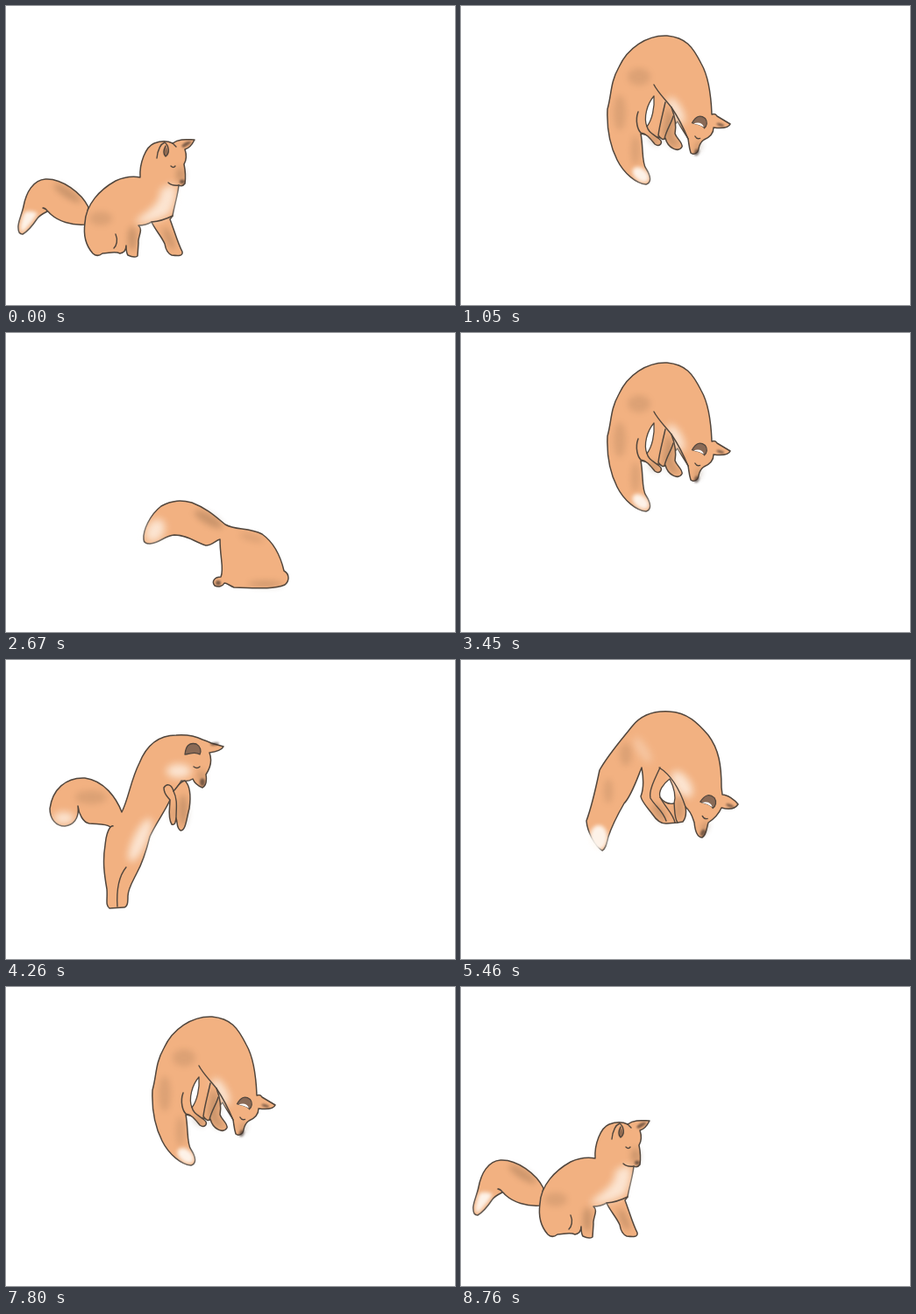
An HTML page without scripts that plays this animation: 512x342 px, repeating every 8.79 s.

```html
<!DOCTYPE html>
<html lang="en">
<head>
<meta charset="utf-8">
<title>Pouncing fox</title>
<style>
html, body { margin: 0; width: 100%; height: 100%; overflow: hidden; background: #fff; }
svg { display: block; width: 512px; height: 342px; overflow: hidden; }

/* drawings sit side by side; the strip steps through them and back */
#strip { animation: leap 2197.5ms infinite alternate; }
@keyframes leap {
  0% { transform: translateX(0); animation-timing-function: step-end; }
  3.71% { transform: translateX(-512px); animation-timing-function: step-end; }
  11.13% { transform: translateX(-1024px); animation-timing-function: step-end; }
  18.54% { transform: translateX(-1536px); animation-timing-function: step-end; }
  25.96% { transform: translateX(-2048px); animation-timing-function: step-end; }
  33.38% { transform: translateX(-2560px); animation-timing-function: step-end; }
  40.8% { transform: translateX(-3072px); animation-timing-function: step-end; }
  48.21% { transform: translateX(-3584px); animation-timing-function: step-end; }
  55.63% { transform: translateX(-4096px); animation-timing-function: step-end; }
  63.05% { transform: translateX(-4608px); animation-timing-function: step-end; }
  70.46% { transform: translateX(-5120px); animation-timing-function: step-end; }
  77.88% { transform: translateX(-5632px); animation-timing-function: step-end; }
  85.3% { transform: translateX(-6144px); animation-timing-function: step-end; }
  92.71%, 100% { transform: translateX(-6656px); animation-timing-function: step-end; }
}

path { stroke-linejoin: round; stroke-linecap: round; }
.b { fill: #f2b181; stroke: #51463d; stroke-width: 1.5; }
.l { fill: none; stroke: #51463d; stroke-width: 1.4; }
.h { fill: #fff; stroke: #51463d; stroke-width: 1.3; }
.e { fill: #8a6a56; stroke: #51463d; stroke-width: 1.3; }
.s { fill: #6e5238; opacity: .3; filter: blur(3.5px); }
.p { fill: #6e5238; opacity: .16; filter: blur(3.5px); }
.k { fill: #3f3029; opacity: .65; filter: blur(1.3px); }
.w { fill: #fff6ec; opacity: .75; filter: blur(4px); }
.t { fill: #fffaf4; opacity: .9; filter: blur(2px); }
</style>
</head>
<body>
<svg viewBox="0 0 512 342" xmlns="http://www.w3.org/2000/svg">
<defs>
  <g id="face">
    <ellipse class="k" cx="25" cy="-6" rx="5" ry="1.8" transform="rotate(-6 25 -6)"/>
    <ellipse class="s" cx="10" cy="31" rx="4" ry="7"/>
    <ellipse class="k" cx="11" cy="38" rx="3" ry="4.5"/>
    <path class="e" d="M-9,6C-8,-4 -4,-8 4,-6C9,-3 10,2 8,6C2,2 -4,6 -9,6Z"/>
    <path class="l" d="M1,20q4,3 7,0"/>
  </g>
  <path id="inner" fill="#fff" d="M-7,6Q1,-1 7,5Q0,4 -7,6Z"/>

  <g id="sit">
    <path class="b" d="M94,230C86,214 64,197 45,198C31,199 23,213 20,229C18,239 13,248 14,254C14,259 16,261 19,261C24,258 31,250 35,244C37,240 43,237 47,235C46,232 44,231 42,231C47,232 48,236 52,239C60,246 74,251 90,250Z"/>
    <path class="t" d="M21,236Q28,233 36,237C33,243 27,251 19,259C14,257 17,246 21,236Z"/>
    <ellipse class="s" cx="70" cy="214" rx="18" ry="5" transform="rotate(33 70 214)"/>
    <path class="b" d="M153,196C152,180 159,161 169,157C177,154 184,154 190,157C198,151 208,153 215,153C212,159 208,163 204,164C206,170 206,176 203,181C204,186 205,196 204,203C202,206 199,206 197,205C196,216 191,232 190,240L187,244C191,254 196,272 201,281C202,286 197,286 189,285C184,283 182,278 181,272C177,263 170,256 166,247C161,250 156,251 151,251C157,256 150,264 151,271L150,286C147,288 143,287 139,285C137,282 137,278 137,274C137,279 135,282 130,283C124,280 117,283 110,283C106,286 102,286 99,283C91,274 88,262 90,248C91,227 107,210 125,200C136,195 147,195 153,196Z"/>
    <path class="w" d="M191,203C199,212 190,234 186,238C176,245 160,249 149,249C146,240 178,232 176,210Z"/>
    <ellipse class="s" cx="144" cy="266" rx="5" ry="14"/>
    <ellipse class="s" cx="186" cy="266" rx="4" ry="14" transform="rotate(-24 186 266)"/>
    <ellipse class="p" cx="108" cy="243" rx="13" ry="8"/>
    <ellipse class="s" cx="199" cy="193" rx="5" ry="9"/>
    <ellipse class="k" cx="201" cy="201" rx="3" ry="2.5"/>
    <path class="k" d="M200,160Q205,154 212,155Q208,160 202,162Z"/>
    <path class="l" d="M172,174C173,165 176,158 181,156C186,160 187,168 182,172C179,169 180,164 182,160M188,183q3,3 5,0M125,261C128,268 126,274 123,277M190,240Q178,246 166,247M190,157L194,161M185,202Q189,206 197,205"/>
    <path class="k" d="M181,171Q179,164 183,160Q186,167 183,171Z"/>
  </g>

  <g id="rear">
    <path class="b" d="M132,174C126,158 112,138 90,135C68,134 53,148 50,170C50,182 57,190 67,190C76,189 84,182 82,167C83,176 88,186 95,187C106,188 114,187 119,191C114,198 114,204 113,212C110,230 112,245 115,262C116,274 113,280 118,284L134,283C139,283 139,276 139,270C139,262 144,254 149,244C154,235 160,218 164,202C170,188 182,172 187,160L200,138C205,139 210,138 213,136C215,141 219,144 224,146C228,144 229,138 228,131C234,122 235,114 232,106C239,105 246,103 248,99L234,95C232,94 230,93 224,91C218,88 208,85 194,86C174,86 160,98 152,118C142,138 140,158 132,174Z"/>
    <ellipse class="w" cx="153" cy="206" rx="8" ry="27" transform="rotate(25 153 206)"/>
    <ellipse class="w" cx="197" cy="127" rx="14" ry="8"/>
    <ellipse class="w" cx="66" cy="181" rx="12" ry="7"/>
    <ellipse class="p" cx="97" cy="157" rx="18" ry="8"/>
    <path class="b" d="M180,146C184,140 189,143 191,150C196,145 198,139 204,138C210,144 211,156 209,170C206,180 205,196 199,195C194,192 196,186 194,181C193,186 193,189 189,188C184,180 187,168 187,160C184,156 180,154 180,146Z"/>
    <ellipse class="s" cx="202" cy="172" rx="5" ry="18"/>
    <ellipse class="s" cx="190" cy="176" rx="2" ry="9"/>
    <path class="l" d="M127,282C126,266 128,248 137,237M191,150C196,160 194,170 194,181M119,191Q122,189 122,190"/>
    <use href="#face" transform="translate(213 102)"/>
  </g>

  <g id="spring">
    <path class="b" d="M100,236C92,226 98,200 112,184C124,170 140,162 152,150C156,120 168,84 196,64C214,52 236,54 248,62L266,68C262,76 256,78 250,78C253,90 250,98 244,106C244,114 240,120 235,118C230,114 228,110 224,108C220,112 217,116 212,120C206,140 198,158 188,172C184,190 178,212 172,232C170,244 162,246 158,242C154,226 154,204 156,188C146,192 136,206 128,222C122,234 110,244 100,236Z"/>
    <ellipse class="w" cx="190" cy="146" rx="8" ry="25" transform="rotate(24 190 146)"/>
    <ellipse class="w" cx="105" cy="230" rx="7" ry="8"/>
    <ellipse class="p" cx="128" cy="194" rx="11" ry="8"/>
    <path class="b" d="M200,126C210,116 218,120 222,130C226,142 228,156 222,164C214,164 214,152 211,146C206,142 200,136 200,126Z"/>
    <ellipse class="s" cx="220" cy="148" rx="3" ry="12"/>
    <path class="l" d="M165,240C164,222 166,206 174,190"/>
    <use href="#face" transform="translate(229 75) scale(.95)"/>
  </g>

  <g id="rise">
    <path class="b" d="M150,220C142,210 142,180 150,160C152,130 158,90 178,60C196,36 222,28 240,36C262,44 270,64 276,92L296,104C292,110 284,110 278,108C280,116 276,124 268,128C268,136 264,144 259,144C254,140 253,134 251,128C244,124 238,118 232,112L230,140L196,150C188,160 186,172 182,190C176,208 164,226 150,220Z"/>
    <ellipse class="w" cx="237" cy="106" rx="9" ry="13"/>
    <ellipse class="w" cx="155" cy="212" rx="8" ry="8"/>
    <ellipse class="p" cx="168" cy="130" rx="7" ry="14"/>
    <path class="b" d="M196,120C192,140 196,156 202,172C206,180 214,176 212,168C208,154 212,140 214,124"/>
    <path class="b" d="M228,108C226,124 228,140 234,152C242,158 246,150 242,142C240,132 242,122 242,116"/>
    <ellipse class="s" cx="235" cy="138" rx="4" ry="12"/>
    <use href="#face" transform="translate(261 101) rotate(16) scale(.9)"/>
  </g>

  <g id="arch">
    <path class="b" d="M211,204C200,203 186,192 178,176C170,160 166,140 167,118C172,100 170,88 180,70C190,48 212,33 235,34C256,36 264,46 274,66C282,80 285,98 286,124C289,123 291,124 292,126L307,135C305,140 296,140 288,139C288,146 284,150 277,153C274,155 272,158 271,163C270,170 264,170 262,168C260,162 260,158 259,152C255,145 250,138 247,132L229,151L205,146C208,162 206,180 211,186C216,194 218,202 211,204Z"/>
    <ellipse class="p" cx="203" cy="81" rx="13" ry="10"/>
    <ellipse class="p" cx="181" cy="122" rx="7" ry="20"/>
    <ellipse class="p" cx="199" cy="165" rx="5" ry="17"/>
    <ellipse class="w" cx="245" cy="120" rx="7" ry="17" transform="rotate(-28 245 120)"/>
    <ellipse class="t" cx="205" cy="193" rx="11" ry="7" transform="rotate(40 205 193)"/>
    <path class="b" d="M202,121C198,132 202,142 205,145C212,146 216,152 221,158C227,162 231,156 226,152C218,146 213,144 212,137"/>
    <path class="b" d="M233,110C230,124 226,138 225,148Q230,155 233,151C236,163 248,168 252,161C253,156 246,152 244,146C246,136 243,124 240,116"/>
    <path class="s" d="M235,115L243,127L242,148L250,160L240,161L229,146Z"/>
    <ellipse class="s" cx="220" cy="153" rx="8" ry="4" transform="rotate(40 220 153)"/>
    <path class="h" d="M220,103C212,112 208,128 212,138C218,130 221,116 220,103Z"/>
    <path class="l" d="M220,90C224,98 232,106 240,116C248,128 254,140 259,152M232,152C234,142 240,134 242,126"/>
    <g transform="translate(273 132) rotate(23) scale(.9)"><use href="#face"/><use href="#inner"/></g>
  </g>

  <g id="fall">
    <path class="b" d="M161,218C152,212 144,196 143,184C150,165 154,145 158,126C168,108 184,90 195,76C206,62 222,58 238,59C258,60 270,72 282,86C294,102 297,120 297,146L298,154C304,154 312,160 316,165C312,171 304,171 297,169C294,176 288,182 282,186C280,192 280,200 275,203C269,203 267,196 266,186C264,180 263,174 256,168C257,174 257,180 253,185L247,186L235,187C228,188 222,182 218,176C212,168 206,162 205,156C209,146 208,134 206,123C200,138 194,156 186,164C178,178 172,190 168,202C166,210 165,216 161,218Z"/>
    <ellipse class="w" cx="207" cy="103" rx="6" ry="17" transform="rotate(-32 207 103)" style="opacity:.3"/>
    <ellipse class="w" cx="252" cy="142" rx="9" ry="17" transform="rotate(-35 252 142)"/>
    <ellipse class="t" cx="157" cy="203" rx="10" ry="14"/>
    <ellipse class="p" cx="188" cy="108" rx="7" ry="13"/>
    <ellipse class="p" cx="168" cy="150" rx="5" ry="14"/>
    <ellipse class="s" cx="226" cy="174" rx="5" ry="12" transform="rotate(-35 226 174)"/>
    <ellipse class="s" cx="249" cy="170" rx="4" ry="14"/>
    <path class="h" d="M238,136C230,142 225,150 227,157C232,164 238,165 243,164C246,154 242,144 238,136Z"/>
    <path class="l" d="M227,123C220,138 214,150 216,158C222,168 230,172 234,184M227,157C234,170 242,176 244,186M243,164C244,172 243,180 247,186M226,123C234,128 246,138 256,168"/>
    <g transform="translate(283 161) rotate(27) scale(.95)"><use href="#face"/><use href="#inner"/></g>
  </g>
</defs>

<g id="strip">
  <use href="#sit"/>
  <use href="#rear" x="512"/>
  <g transform="translate(1024)"><use href="#rear" transform="translate(18 -18) rotate(7 150 190)"/></g>
  <use href="#spring" x="1536"/>
  <g transform="translate(2048)"><use href="#spring" transform="translate(12 -22) rotate(14 170 140)"/></g>
  <use href="#rise" x="2560"/>
  <use href="#arch" x="3072"/>
  <use href="#fall" x="3584"/>
  <g transform="translate(4096)"><use href="#fall" transform="translate(32 48) rotate(18 230 120)"/></g>

  <g transform="translate(4608)">
    <path class="b" d="M116,206C112,192 124,170 148,158C172,148 196,150 214,148C236,124 268,128 292,156C310,180 322,215 326,250C334,262 336,276 330,285C326,293 300,294 288,291C270,288 262,276 262,262C258,268 250,272 240,270C232,262 236,250 238,240C230,224 214,206 200,200C178,194 150,200 138,210C128,216 118,214 116,206Z"/>
    <ellipse class="w" cx="126" cy="198" rx="9" ry="10"/>
    <ellipse class="p" cx="196" cy="170" rx="18" ry="7"/>
    <ellipse class="s" cx="246" cy="258" rx="5" ry="9"/>
    <path class="l" d="M262,262C260,250 258,240 252,230"/>
  </g>

  <g transform="translate(5120)">
    <path class="b" d="M162,218C160,200 174,184 190,180C210,178 234,192 250,205C268,206 288,214 304,232C314,248 317,262 320,274C325,280 322,287 316,290C300,293 280,292 260,291L249,287C246,291 240,291 238,288C236,282 241,279 245,278C247,266 245,250 241,232C232,236 222,234 214,226C202,218 188,218 178,224C170,228 162,226 162,218Z"/>
    <ellipse class="w" cx="172" cy="212" rx="9" ry="9"/>
    <ellipse class="s" cx="228" cy="205" rx="16" ry="6" transform="rotate(32 228 205)"/>
    <ellipse class="s" cx="242" cy="285" rx="3" ry="3"/>
  </g>

  <g transform="translate(5632)">
    <path class="b" d="M157,236C156,226 164,208 177,198C190,191 200,191 212,194C230,201 240,211 250,219C262,226 276,222 292,230C306,240 313,255 317,272C324,276 323,284 318,288C306,293 290,292 260,291C255,289 252,286 249,286C247,290 242,291 238,289C234,284 238,279 245,279C249,270 244,258 244,236C239,237 235,243 228,243C216,240 208,231 192,231C180,232 176,240 164,241C159,241 157,239 157,236Z"/>
    <ellipse class="w" cx="170" cy="226" rx="10" ry="14" transform="rotate(30 170 226)"/>
    <ellipse class="s" cx="231" cy="213" rx="18" ry="6" transform="rotate(30 231 213)"/>
    <ellipse class="p" cx="280" cy="234" rx="14" ry="4" transform="rotate(15 280 234)"/>
    <ellipse class="s" cx="296" cy="287" rx="20" ry="3"/>
    <ellipse class="k" cx="242" cy="286" rx="3" ry="3"/>
  </g>

  <g transform="translate(6144)">
    <path class="b" d="M148,228C145,216 150,210 157,210C168,212 167,228 179,233C204,235 232,231 262,231C276,231 286,233 294,241C304,252 314,268 321,283C321,289 316,291 300,291L258,291C252,288 246,293 240,291C237,288 243,284 241,279C238,272 238,262 235,260C230,258 232,266 226,270C216,274 200,270 184,268C166,264 152,245 148,228Z"/>
    <ellipse class="w" cx="156" cy="225" rx="8" ry="14" transform="rotate(-12 156 225)"/>
    <ellipse class="s" cx="213" cy="241" rx="17" ry="6"/>
    <ellipse class="k" cx="222" cy="237" rx="6" ry="2"/>
    <ellipse class="p" cx="290" cy="252" rx="5" ry="16" transform="rotate(-35 290 252)"/>
    <ellipse class="s" cx="294" cy="287" rx="22" ry="3"/>
  </g>

  <g transform="translate(6656)">
    <path class="b" d="M141,192C140,180 146,175 153,177C166,186 166,212 186,227C206,235 232,231 262,231C276,231 286,233 294,241C304,252 314,268 321,283C321,289 316,291 300,291L258,291C252,288 246,293 240,291C237,288 243,284 241,279C238,272 238,262 235,260C230,258 232,266 226,269C216,273 198,268 182,261C160,248 144,215 141,192Z"/>
    <ellipse class="w" cx="151" cy="193" rx="8" ry="15" transform="rotate(-14 151 193)"/>
    <ellipse class="s" cx="212" cy="240" rx="17" ry="6"/>
    <ellipse class="k" cx="221" cy="237" rx="6" ry="2"/>
    <ellipse class="s" cx="294" cy="287" rx="22" ry="3"/>
  </g>
</g>
</svg>
</body>
</html>
```
